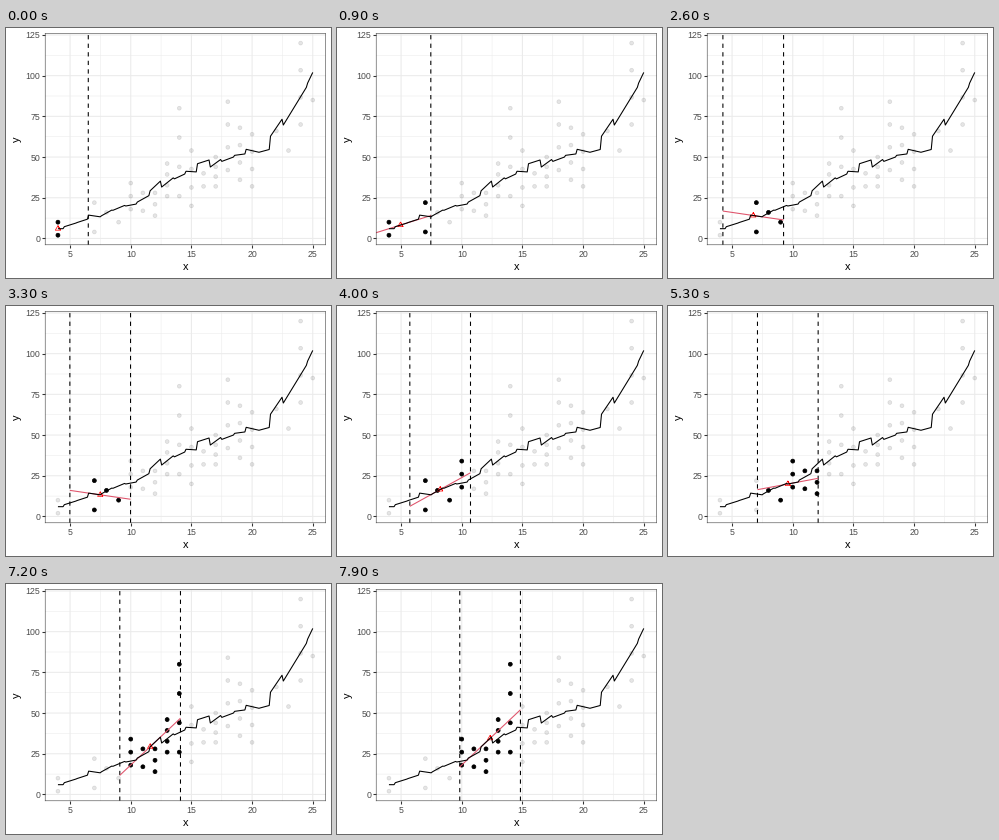
These frames come from a looping animation (325 by 250 pixels, 8000 ms). A matplotlib script:

```python
import numpy as np
import matplotlib.pyplot as plt
from matplotlib.animation import FuncAnimation

W, H = 325, 250
LEFT, RIGHT, TOP, BOTTOM = 39.2, 319.5, 5.5, 216.8
HALF = 2.5          # half width of the regression window
FRAMES = 80
LINE = 1.07
STROKE = 0.71

plt.rcParams.update({
    "font.family": "Liberation Sans",
    "path.snap": False,
    "axes.axisbelow": True,
})


def column(x, low, high):
    """Evenly spread dots at x; wider and faster columns hold more."""
    count = min(4, 1 + int(np.ceil(x * (high - low) / 129)))
    return [(x, y) for y in np.linspace(low, high, count)]


# Shortest and longest stopping distance at each speed
speeds = [4, *range(7, 21), *range(22, 26)]
lows = [2, 4, 16, 10, 18, 17, 14, 26, 26, 20, 32, 32, 42, 36, 32,
        66, 54, 70, 85]
highs = [10, 22, 16, 10, 34, 28, 28, 46, 80, 54, 40, 50, 84, 68, 64,
         66, 54, 120, 85]
points = np.array([dot for key in zip(speeds, lows, highs)
                   for dot in column(*key)], dtype=float)
speed, dist = points.T
grid = np.linspace(4, 25, 200)


def in_window(x0):
    return np.abs(speed - x0) <= HALF


def local_fit(x0):
    """Value at x0 and slope of the least-squares line in the window."""
    near = in_window(x0)
    dx = speed[near] - speed[near].mean()
    mean = dist[near].mean()
    sxx = (dx ** 2).sum()
    if sxx == 0:
        return mean, np.nan
    slope = (dx * dist[near]).sum() / sxx
    return mean + slope * (x0 - speed[near].mean()), slope


fits = [local_fit(x0) for x0 in grid]

fig = plt.figure(figsize=(W / 72, H / 72), dpi=72, facecolor="white")
ax = fig.add_axes([LEFT / W, 1 - BOTTOM / H,
                   (RIGHT - LEFT) / W, (BOTTOM - TOP) / H])
ax.set_xlim(2.95, 26.05)
ax.set_ylim(-3.9, 125.9)
ax.set_xticks(np.arange(5, 26, 5))
ax.set_yticks(np.arange(0, 126, 25))
ax.set_xticks(np.arange(7.5, 25, 5), minor=True)
ax.set_yticks(np.arange(12.5, 120, 25), minor=True)
ax.tick_params(which="major", length=2.75, width=LINE, pad=2.2,
               color="#333333", labelcolor="#4d4d4d", labelsize=8.8)
ax.tick_params(which="minor", length=0)
ax.grid(which="major", color="#ebebeb", lw=LINE)
ax.grid(which="minor", color="#ebebeb", lw=LINE / 2)
for spine in ax.spines.values():
    spine.set(color="#333333", linewidth=LINE / 2, zorder=10)

fig.text((LEFT + RIGHT) / 2 / W, 1 - 242 / H, "x", size=11,
         ha="center", va="baseline")
fig.text(13.5 / W, 1 - (TOP + BOTTOM) / 2 / H, "y", size=11, rotation=90,
         rotation_mode="anchor", ha="center", va="baseline")


def add_dots(z, alpha):
    sizes = np.full(len(points), 3.9 ** 2)
    return ax.scatter(speed, dist, s=sizes, c="black", alpha=alpha,
                      lw=STROKE, zorder=z)


def add_line(color, z, lw=LINE, **style):
    return ax.plot([], [], color=color, lw=lw, zorder=z,
                   solid_joinstyle="round", solid_capstyle="butt",
                   dash_capstyle="butt", **style)[0]


add_dots(2, 0.1)
active = add_dots(3, 1)
edges = [add_line("black", 4, ls=(0, (4, 4))) for _ in range(2)]
fit_line = add_line("#df536b", 5)
marker = add_line("red", 6, lw=STROKE)
add_line("black", 7).set_data(grid, [value for value, _ in fits])

# Triangle outline, converted from pixels to data units
tri_x = np.array([0, 2.63, -2.63, 0, 2.63]) * 23.1 / (RIGHT - LEFT)
tri_y = np.array([3.03, -1.51, -1.51, 3.03, -1.51]) * 129.8 / (BOTTOM - TOP)


def update(i):
    x0 = grid[i]
    value, slope = fits[i]
    span = np.array([-HALF, HALF])
    active.set_offsets(points[in_window(x0)])
    for edge, x in zip(edges, x0 + span):
        edge.set_data([x, x], ax.get_ylim())
    if np.isnan(slope):
        fit_line.set_data([], [])
    else:
        fit_line.set_data(x0 + span, value + slope * span)
    marker.set_data(x0 + tri_x, value + tri_y)
    return [active, *edges, fit_line, marker]


anim = FuncAnimation(fig, update, frames=FRAMES, interval=100,
                     repeat=True, repeat_delay=0)
plt.show()
```
